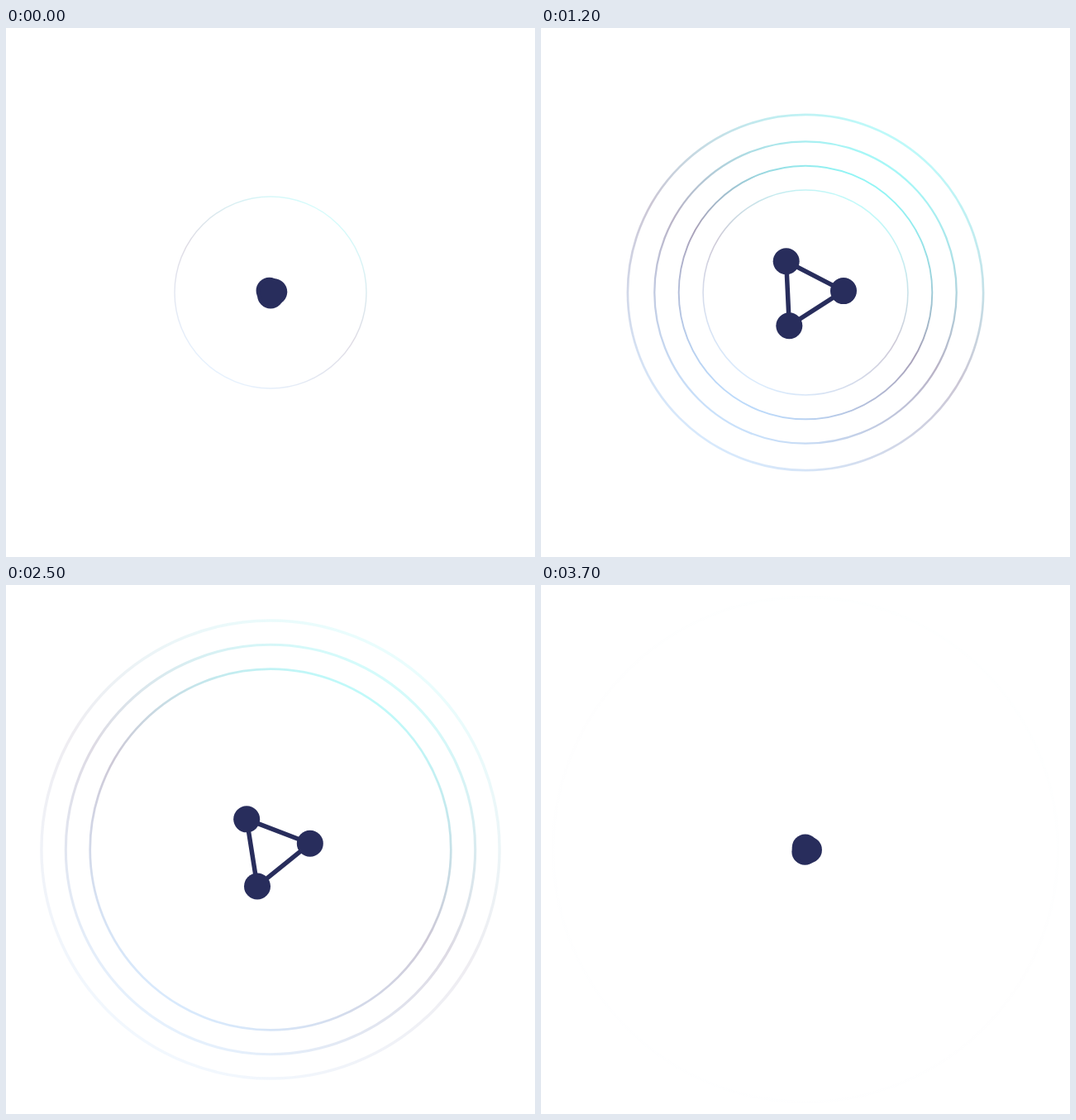
These frames come from a looping animation (640 by 640 pixels, 3.8 s). An HTML page:

```html
<!DOCTYPE html>
<html lang="en">
<head>
<meta charset="utf-8">
<title>Pulse loader</title>
<style>
  html, body { margin: 0; width: 100%; height: 100%; overflow: hidden; background: #fff; }
  svg { display: block; width: 100%; height: 100%; }
  .rings circle { fill: none; stroke: url(#tint); }
  .node { fill: #282d5c; }
  .link { fill: none; stroke: #282d5c; stroke-width: 5.5; stroke-linejoin: round; }
</style>
</head>
<body>
<svg viewBox="0 0 640 640">
  <defs>
    <linearGradient id="tint" x1=".75" y1=".067" x2=".25" y2=".933">
      <stop offset="0" stop-color="#20ebeb"/>
      <stop offset=".5" stop-color="#503f70"/>
      <stop offset="1" stop-color="#78b4f5"/>
    </linearGradient>
  </defs>
  <g class="rings">
    <circle cx="320" cy="320"/>
    <circle cx="320" cy="320"/>
    <circle cx="320" cy="320"/>
    <circle cx="320" cy="320"/>
  </g>
  <polygon class="link"/>
  <circle class="node" r="16"/>
  <circle class="node" r="16"/>
  <circle class="node" r="16"/>
</svg>
<script>
const LOOP = 3800, STEP = 100, LEAD = 20;
const CX = 321, CY = 320.2;
const rings = document.querySelectorAll('.rings circle');
const nodes = document.querySelectorAll('.node');
const link = document.querySelector('.link');

// start radius and growth per second
const growth = [[116, 82.6], [95.6, 72.6], [66.2, 72.6], [36.8, 72.6]];
const fade = [[100, 0], [145, 0.52], [307, 0]];
// distance of the nodes from the centre, twice per loop
const spread = [[0, 3.4], [100, 11.5], [880, 67.5], [1842, 0], [1900, 3.4]];

function lerpKeys(keys, x) {
  if (x <= keys[0][0]) return keys[0][1];
  for (let i = 1; i < keys.length; i++) {
    const [x0, y0] = keys[i - 1], [x1, y1] = keys[i];
    if (x <= x1) return y0 + (y1 - y0) * (x - x0) / (x1 - x0);
  }
  return keys[keys.length - 1][1];
}

function draw(t) {
  rings.forEach((ring, i) => {
    const r = growth[i][0] + growth[i][1] * t / 1000;
    ring.setAttribute('r', r);
    ring.setAttribute('stroke-width', r * 0.0125);
    ring.setAttribute('opacity', lerpKeys(fade, r));
  });

  const d = lerpKeys(spread, t % (LOOP / 2));
  const turn = 104.7 - 720 * t / LOOP;
  const points = [];
  nodes.forEach((node, i) => {
    const a = (turn + i * 120) * Math.PI / 180;
    const x = CX + d * Math.cos(a), y = CY + d * Math.sin(a);
    node.setAttribute('cx', x);
    node.setAttribute('cy', y);
    points.push(x + ',' + y);
  });
  link.setAttribute('points', points.join(' '));
}

function tick() {
  const t = (performance.now() + LEAD) % LOOP;
  draw(Math.floor(t / STEP) * STEP);
  requestAnimationFrame(tick);
}
tick();
</script>
</body>
</html>
```
